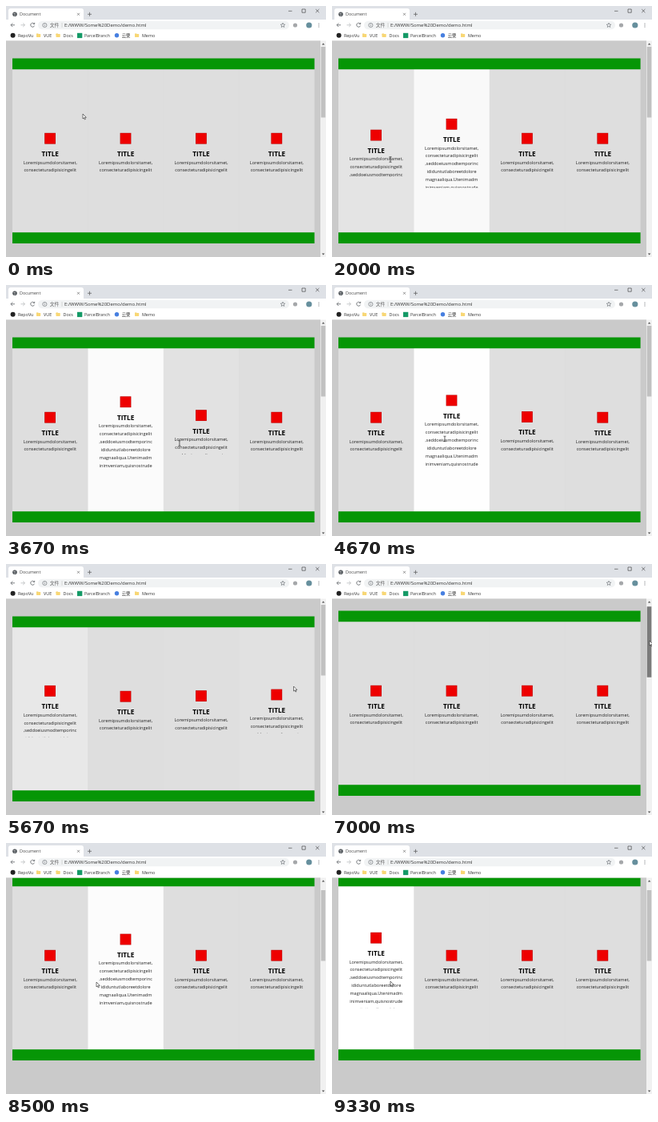
An HTML page with a canvas that plays this animation: 400 by 314 pixels, repeating every 9.49 s.

```html
<!DOCTYPE html>
<html lang="en">
<head>
<meta charset="utf-8">
<title>Document</title>
<style>
  html, body { margin: 0; width: 100%; height: 100%; overflow: hidden; }
  canvas { display: block; width: 400px; height: 314px; }
</style>
</head>
<body>
<canvas></canvas>
<script>
const canvas = document.querySelector('canvas');
const c = canvas.getContext('2d');
const ratio = window.devicePixelRatio || 1;
canvas.width = 400 * ratio;
canvas.height = 314 * ratio;

const LOOP = 9490, FPS = 6, FADE = 0.5;
const LEFT = 8, COLUMN = 94.4, RISE = 22;
const SANS = '"Open Sans", "Noto Sans", "Noto Sans CJK SC", "Noto Sans CJK", sans-serif';
const LINES = [
  'Loremipsumdolorsitamet,', 'consecteturadipisicingelit', ',seddoeiusmodtemporinc',
  'ididuntutlaboreetdolore', 'magnaaliqua.Utenimadm', 'inimveniam,quisnostrude',
  'xercitationullamcolabor'
];

// Pointer path: seconds, x, y
const PATH = [
  [0, 96, 135], [.3, 96, 136], [.6, 150, 190], [1.8, 150, 195], [2, 73, 190],
  [2.5, 60, 190], [2.7, 150, 194], [3.5, 160, 194], [3.667, 217, 196], [4.2, 250, 198],
  [4.35, 150, 195], [4.7, 140, 190], [4.9, 60, 180], [5.43, 60, 165], [5.667, 360, 153],
  [6.1, 362, 150], [6.3, 397, 94], [6.78, 397, 94], [7, 397, 96], [7.58, 397, 102],
  [7.85, 397, 102], [8.25, 150, 176], [8.5, 113, 174], [8.7, 85, 175], [9.33, 73, 173], [9.5, 73, 173]
];

const clamp = v => Math.max(0, Math.min(1, v));
const mix = (a, b, p) => a + (b - a) * p;

// CSS "ease": cubic-bezier(.25, .1, .25, 1)
function ease(x) {
  if (x <= 0 || x >= 1) return clamp(x);
  const bezier = (a, b, s) => 3 * a * s * (1 - s) ** 2 + 3 * b * s * s * (1 - s) + s ** 3;
  let low = 0, high = 1;
  for (let i = 0; i < 20; i++) {
    const mid = (low + high) / 2;
    if (bezier(.25, .25, mid) < x) low = mid; else high = mid;
  }
  return bezier(.1, 1, low);
}

function pointerAt(t) {
  const i = Math.max(1, PATH.findIndex(p => p[0] >= t));
  const [a, b] = [PATH[i - 1], PATH[i]];
  const p = (t - a[0]) / (b[0] - a[0]);
  return { x: mix(a[1], b[1], p), y: mix(a[2], b[2], p) };
}

const hovers = [];
for (let t = .3, last = 0; t < LOOP / 1000; t += .005) {
  const card = Math.floor((pointerAt(t).x - LEFT) / COLUMN);
  if (card !== last) hovers.push({ t, card });
  last = card;
}

function openness(card, t) {
  let from = 0, to = 0, start = 0;
  const at = time => from === to ? to
    : mix(from, to, ease((time - start) / (FADE * Math.abs(to - from))));
  for (const hover of hovers) {
    if (hover.t > t) break;
    const target = hover.card === card ? 1 : 0;
    if (target !== to) {
      from = at(hover.t);
      to = target;
      start = hover.t;
    }
  }
  return at(t);
}

function rect(x, y, w, h, color, radius = 0) {
  c.fillStyle = color;
  c.beginPath();
  c.roundRect(x, y, w, h, radius);
  c.fill();
}

function circle(x, y, r, color) {
  c.fillStyle = color;
  c.beginPath();
  c.arc(x, y, r, 0, 7);
  c.fill();
}

function text(str, x, y, size, color = '#333', align = 'left', weight = 400) {
  c.font = `${weight} ${size}px ${SANS}`;
  c.textAlign = align;
  c.fillStyle = color;
  c.fillText(str, x, y);
}

function stroke(d, color = '#5f6368', width = .8) {
  c.strokeStyle = color;
  c.lineWidth = width;
  c.stroke(new Path2D(d));
}

function shape(d, color) {
  c.fillStyle = color;
  c.fill(new Path2D(d));
}

function drawCard(i, open) {
  const x = LEFT + i * COLUMN, center = x + COLUMN / 2, y = -RISE * open;
  const shade = Math.round(mix(222, 255, open));
  rect(x, 79, COLUMN + (i < 3 ? .4 : 0), 204.5, `rgb(${shade},${shade},${shade})`);
  rect(center - 7, 158.8 + y, 13.8, 13.8, '#b80808');
  rect(center - 6.5, 159.3 + y, 12.8, 12.8, '#ee0000');
  text('TITLE', center, 188.2 + y, 8.2, '#000', 'center', 700);
  c.save();
  c.beginPath();
  c.rect(x, 189.5 + y, COLUMN, 20 + 2 * RISE * open);
  c.clip();
  LINES.forEach((line, n) => text(line, center, 197.5 + y + n * 9.9, 5.55, '#222', 'center'));
  c.restore();
}

function drawPage(t, scroll) {
  rect(0, 43, 400, 271, '#cacaca');
  c.save();
  c.translate(0, -scroll);
  for (let i = 0; i < 4; i++) drawCard(i, openness(i, t));
  rect(LEFT, 65.5, 377.6, 13.8, '#069606');
  rect(LEFT, 283.2, 377.6, 13.8, '#069606');
  c.restore();
}

function drawScrollbar(scroll, active) {
  rect(393, 43, 7, 271, '#f1f1f1');
  rect(393.7, 51 + scroll * .32, 5.6, 88.5, active ? '#7b7b7b' : '#c1c1c1');
  shape('M394.8 48.5l1.8-2 1.8 2z', '#505050');
  shape('M394.8 309.5l1.8 2 1.8-2z', '#505050');
}

function folder(x) {
  rect(x, 34.4, 2.5, 2, '#f2cd62', .4);
  rect(x, 35, 5.2, 4, '#f8d775', .4);
}

function drawBrowser() {
  rect(0, 0, 400, 18, '#dee1e6');
  rect(3, 3, 94, 18, '#fff', 3);
  rect(0, 17, 400, 26.5, '#fff');
  circle(11, 10.2, 2.8, '#50555a');
  stroke('M9.4 9.3l1.6.6 1-1.2M10.2 12l1.7-.6', '#fff', .6);
  text('Document', 17, 12.3, 5.4, '#444');
  stroke('M89 8.8l3 3m0-3l-3 3', '#555', .6);
  stroke('M102 10.3h5m-2.5-2.5v5', '#555', .7);
  stroke('M353 6.3h4.5M370 4h4.2v4.2h-4.2zM387.2 4l4.2 4.2m0-4.2l-4.2 4.2', '#333', .6);

  stroke('M11 23.8H6m2.3-2.3L6 23.8l2.3 2.3');
  stroke('M18.5 23.8h5m-2.3-2.3l2.3 2.3-2.3 2.3', '#b8babd');
  stroke('M35.3 22.3a2.5 2.5 0 1 0 .3 2.3M35.7 20.8v1.8h-1.8');
  rect(40, 18.8, 314, 10.4, '#f1f3f4', 5.2);
  stroke('M51 24a2.6 2.6 0 1 0-5.2 0a2.6 2.6 0 1 0 5.2 0M48.4 23.6v1.7M48.4 22.3v.7', '#5f6368', .6);
  text('文件', 54.8, 26, 5.8, '#666');
  stroke('M70 21v6', '#bbb', .5);
  text('E:/WWW/Some%20Demo/demo.html', 73, 26, 5.95, '#333');
  stroke('M346 21.2l.8 1.8 2 .2-1.5 1.3.5 2-1.8-1.1-1.8 1.1.5-2-1.5-1.3 2-.2z', '#5f6368', .6);
  circle(361.5, 24, 2.6, '#a5a7aa');
  circle(378.8, 24, 3.6, '#668f9d');
  for (const y of [22, 24, 26]) circle(391, y, .6, '#5f6368');

  circle(8.6, 36.8, 3, '#222');
  text('RepoVu', 15, 38.9, 5.4);
  folder(38);
  text('VUE', 47, 38.9, 5.4);
  folder(62.5);
  text('Docs', 71.5, 38.9, 5.4);
  rect(89, 33.8, 6.3, 6.3, '#159a67');
  text('ParcelBranch', 98, 38.9, 5.2);
  circle(138.5, 36.8, 2.7, '#477fe0');
  text('云栗', 144.8, 38.9, 5.3);
  folder(161);
  text('Memo', 170, 38.9, 5.4);
  rect(0, 43, 393, .5, '#d5d5d5');
}

function drawPointer({ x, y }) {
  if (y > 186) {
    stroke(`M${x - 1.5} ${y - 1.3}h1.2l.3.4.3-.4h1.2M${x} ${y - 1}v6M${x - 1.5} ${y + 5.3}h1.2l.3-.4.3.4h1.2`, '#222', .7);
    return;
  }
  const arrow = `M${x} ${y}v6l1.4-1.2 1 2.2 1-.5-1-2.1h1.9z`;
  shape(arrow, '#fff');
  stroke(arrow, '#222', .6);
}

function draw(now) {
  const t = Math.floor((now % LOOP) * FPS / 1000 + .03) / FPS;
  const pointer = pointerAt(t);
  const scroll = Math.round(25 * clamp((t - 6.78) / .8));
  c.setTransform(ratio, 0, 0, ratio, 0, 0);
  drawPage(t, scroll);
  drawScrollbar(scroll, pointer.x > 393);
  drawBrowser();
  drawPointer(pointer);
}

const begin = performance.now();
function tick() {
  draw(performance.now() - begin);
  requestAnimationFrame(tick);
}
tick();
</script>
</body>
</html>
```
